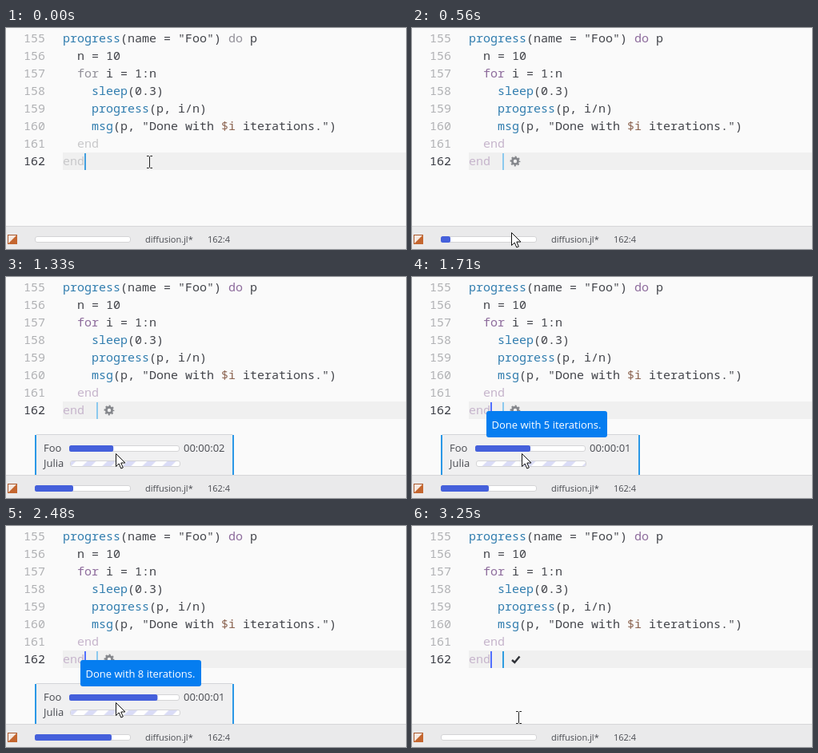
Write an HTML page that moves like this. It is 500 by 277 pixels and loops after 3550 ms.

```html
<!DOCTYPE html>
<html lang="en">
<head>
<meta charset="utf-8">
<title>Progress bars in an editor</title>
<style>
  html, body { margin: 0; width: 100%; height: 100%; overflow: hidden; background: #fafafa; }
  svg { display: block; width: 500px; height: 277px; }
  text { white-space: pre; font: 13px "Open Sans", "Noto Sans", sans-serif; fill: #484a50; }
  #code text { font: 15px "Noto Sans Mono", "DejaVu Sans Mono", monospace; fill: #42444a; }
  #code .num { fill: #b0b1b4; }
  #code .now { fill: #383a42; }
  .fn { fill: #2f7cae; }
  .kw { fill: #8d6b9c; }
  .end { fill: #c6b5cc; }
  .var { fill: #8c6552; }
  .idle .kw { fill: #929099; }
  .idle .end { fill: #c8c8ca; }
  .small text { font-size: 11px; }
  .track { fill: #fff; stroke: #d4d4d6; }
  .fill { fill: #4560db; }
</style>
</head>
<body>
<svg viewBox="0 0 500 277">
  <defs>
    <pattern id="stripes" width="25" height="8" y="230" patternUnits="userSpaceOnUse">
      <path d="M3 8L11 0H22L14 8Z" fill="#dadcf6"/>
    </pattern>
  </defs>
  <rect width="500" height="277" fill="#fafafa"/>
  <rect x="71" y="156" width="429" height="22" fill="#f0f0f0"/>
  <g id="code"></g>
  <rect id="caret" x="98" y="157" width="2" height="21"/>

  <g id="result">
    <rect id="mark" x="113" y="157" width="2" height="21"/>
    <g id="gear" transform="translate(129 167)" fill="none" stroke="#85878c">
      <circle r="3.6" stroke-width="2.8"/>
      <circle r="5.4" stroke-width="2" stroke-dasharray="2.1 2.141" stroke-dashoffset="1.05"/>
    </g>
    <path id="check" d="M125 168L128.3 171L134.5 163.5" fill="none" stroke="#303238" stroke-width="2.5"/>
  </g>

  <g id="panel">
    <path d="M36 249V200Q36 197 39 197H282Q285 197 285 200V249Z" fill="#f0f0f1"/>
    <path d="M38 197.5H283" stroke="#d3d5d8"/>
    <path d="M37 249V198M284 249V198" stroke="#2b98e6" stroke-width="2"/>
    <text x="47" y="219">Foo</text>
    <text x="47" y="238">Julia</text>
    <text id="eta" x="222" y="219" font-size="12.6"></text>
    <rect class="track" x="79.5" y="211.5" width="137" height="7" rx="2.5"/>
    <rect class="fill" id="fooBar" x="79" y="211" height="8" rx="2.5"/>
    <rect class="track" x="80.5" y="230.5" width="137" height="7" rx="2.5"/>
    <rect x="81" y="231" width="136" height="6" rx="2" fill="url(#stripes)"/>
  </g>

  <g class="small">
    <rect y="248" width="500" height="29" fill="#eaeaeb"/>
    <path d="M0 248.5H500" stroke="#d6d6d8"/>
    <rect x="2.5" y="259.5" width="11" height="11" fill="#f6e9e1" stroke="#a9592f"/>
    <path d="M14 259V271H2Z" fill="#c4662f"/>
    <rect class="track" x="36.5" y="261.5" width="119" height="7" rx="2.5"/>
    <rect class="fill" id="mainBar" x="36" y="261" height="8" rx="2.5"/>
    <text x="174" y="269">diffusion.jl*</text>
    <text x="252" y="269">162:4</text>
  </g>

  <g id="tip">
    <rect x="93" y="168" width="151" height="33" rx="3" fill="#057df0"/>
    <text id="tipText" x="99.5" y="190" style="fill:#fff;font-weight:500"></text>
  </g>

  <path id="arrow" d="M.5 .5V16.5L4.2 13L6.8 19L9.3 18L6.8 12H12Z" fill="#fff" stroke="#111"/>
  <path id="beam" d="M-3.5 -7.5H-1L0 -6.5L1 -7.5H3.5M0 -6.5V6.5M-3.5 7.5H-1L0 6.5L1 7.5H3.5" fill="none" stroke="#222"/>
</svg>
<script>
const $ = id => document.getElementById(id);
const LOOP = 3550, RUN = 230, OPEN = 860, FIRST = 310, ITER = 305, DONE = 3090;

const span = (cls, text) => `<tspan class="${cls}">${text}</tspan>`;
const fn = text => span("fn", text), kw = text => span("kw", text);
const lines = [
  `${fn("progress")}(name = "Foo") ${kw("do")} p`,
  "  n = 10",
  `  ${kw("for")} i = 1:n`,
  `    ${fn("sleep")}(0.3)`,
  `    ${fn("progress")}(p, i/n)`,
  `    ${fn("msg")}(p, "Done with ${span("var", "$i")} iterations.")`,
  `  ${span("end", "end")}`,
  span("end", "end")
];
$("code").innerHTML = lines.map((line, i) => {
  const y = 18 + 22 * i;
  return `<text class="num ${i === 7 ? "now" : ""}" x="22" y="${y}">${155 + i}</text>` +
    `<text x="71" y="${y}">${line}</text>`;
}).join("");

// Pointer keys: time, x, y
const path = [
  [150, 179, 168], [470, 124, 256], [640, 124, 256], [860, 119, 267], [1030, 119, 267],
  [1330, 137, 221], [2500, 137, 221], [2760, 131, 229], [2950, 131, 229], [3170, 133, 240]
];

function pointer(t) {
  const next = path.findIndex(key => key[0] > t);
  if (next === 0) return path[0].slice(1);
  if (next < 0) return path[path.length - 1].slice(1);
  const [t0, x0, y0] = path[next - 1], [t1, x1, y1] = path[next];
  const p = (t - t0) / (t1 - t0), e = p * p * (3 - 2 * p);
  return [Math.round(x0 + (x1 - x0) * e), Math.round(y0 + (y1 - y0) * e)];
}

function step(t) {
  if (t < 150) return 0;
  if (t < 633) return 150 + Math.floor((t - 150) / 82) * 82;
  return Math.min(3250, 635 + Math.floor((t - 633) / 76.9) * 76.9);
}

const show = (id, on) => { $(id).style.display = on ? "" : "none"; };

function draw(now) {
  const t = step(now % LOOP);
  const running = t >= RUN && t < DONE, open = t >= OPEN && t < DONE;
  const count = running ? Math.max(0, Math.min(10, Math.floor((t - FIRST) / ITER) + 1)) : 0;

  $("code").classList.toggle("idle", t < RUN);
  show("caret", (t + 90) % 800 < 400);
  $("caret").setAttribute("fill", t < RUN ? "#429fdf" : "#526fff");

  show("result", t >= RUN);
  show("gear", running);
  show("check", !running);
  $("mark").setAttribute("fill", running ? "#8cc9ee" : "#2f9de0");

  show("panel", open);
  $("mainBar").setAttribute("width", 12 * count);
  $("fooBar").setAttribute("width", 13.8 * count);
  $("eta").textContent = count < 5 ? "00:00:02" : "00:00:01";
  $("stripes").setAttribute("x", 79 + 14 - t / 50);

  show("tip", t >= 1400 && t < 2620);
  $("tipText").textContent = `Done with ${count} iterations.`;

  const [x, y] = pointer(t), overText = y < 249 && !open;
  show("beam", overText);
  show("arrow", !overText);
  $("arrow").setAttribute("transform", `translate(${x} ${y})`);
  $("beam").setAttribute("transform", `translate(${x + .5} ${y})`);
}

const start = performance.now();
function frame() {
  draw(performance.now() - start);
  requestAnimationFrame(frame);
}
frame();
</script>
</body>
</html>
```
